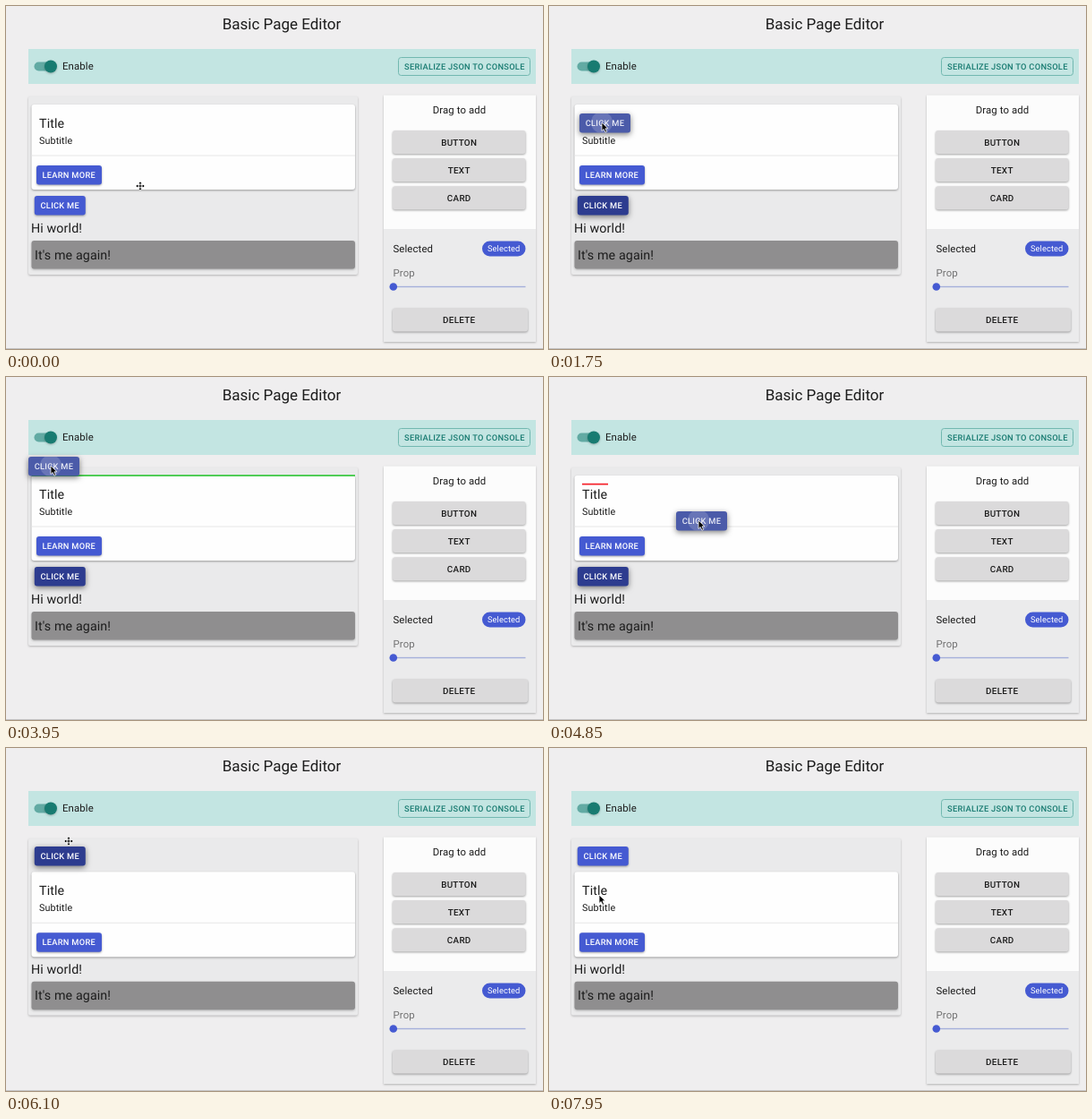
These frames come from a looping animation (600x383 px, 8 s). An HTML page:

```html
<!DOCTYPE html>
<html lang="en">
<head>
<meta charset="utf-8">
<title>Basic Page Editor</title>
<style>
  html, body { margin: 0; width: 100%; height: 100%; overflow: hidden; background: #efeeef; }
  svg { display: block; width: 600px; height: 383px; font-family: Roboto, sans-serif; text-rendering: geometricPrecision; }
  text { font-size: 11.4px; letter-spacing: .1px; fill: #1c1c1c; }
  .mid { text-anchor: middle; }
  .heading { font-size: 14.3px; }
  .small { font-size: 9.3px; font-weight: 500; letter-spacing: .27px; fill: #fff; }
  .large { font-size: 9.9px; font-weight: 500; letter-spacing: .28px; }
  .raised { filter: drop-shadow(0 1.2px 1px rgba(0,0,0,.35)); }
  .lifted { filter: drop-shadow(0 2px 3px rgba(0,0,0,.5)); }
  .paper { filter: drop-shadow(0 1px .8px rgba(0,0,0,.25)); }
</style>
</head>
<body>
<svg viewBox="0 0 600 383">
  <defs>
    <clipPath id="buttonShape"><rect width="57" height="21.5" rx="3"/></clipPath>
  </defs>
  <rect width="600" height="383" fill="#efeeef"/>
  <rect y="382" width="600" height="1" fill="#c4c3c4"/>
  <text class="mid" x="308" y="25.5" style="font-size:17px;letter-spacing:0">Basic Page Editor</text>

  <rect x="25" y="48" width="567" height="39" fill="#c3e5e2"/>
  <rect x="31.5" y="62.5" width="24" height="10" rx="5" fill="#62aaa3"/>
  <circle class="paper" cx="50" cy="67.5" r="7" fill="#187b71"/>
  <text x="63" y="71.3">Enable</text>
  <rect x="438.5" y="57.5" width="147" height="20" rx="3" fill="none" stroke="#72b8b0"/>
  <text class="small" x="445" y="70.6" style="fill:#187b71">SERIALIZE JSON TO CONSOLE</text>

  <rect id="container" class="paper" x="25" y="101" width="368" rx="2" fill="#eaeaeb"/>
  <g id="card">
    <rect class="raised" x="28.5" y="110" width="361.5" height="95" rx="3" fill="#fefefe"/>
    <rect x="28.5" y="166.5" width="361.5" height="1" fill="#e7e7e7"/>
    <text class="heading" x="37" y="136">Title</text>
    <text x="37" y="154" style="font-size:10.8px">Subtitle</text>
    <rect class="raised" x="34" y="178" width="73" height="21.5" rx="3" fill="#455ad2"/>
    <text class="small" x="40.5" y="192.1">LEARN MORE</text>
  </g>
  <g id="button">
    <rect width="57" height="21.5" rx="3"/>
    <text class="small" x="6.7" y="14.1">CLICK ME</text>
  </g>
  <g id="texts">
    <text class="heading" x="28" y="253.2">Hi world!</text>
    <rect class="paper" x="28.5" y="262" width="361.5" height="31.5" rx="3" fill="#8f8e8f"/>
    <text class="heading" x="32" y="282.8">It's me again!</text>
  </g>

  <g class="paper">
    <rect x="422" y="249" width="170" height="126" fill="#ebebec"/>
    <rect x="422" y="99.5" width="170" height="149.5" fill="#fcfcfc"/>
  </g>
  <text class="mid" x="506.5" y="120">Drag to add</text>
  <g id="tools"></g>
  <text x="432.5" y="274.8">Selected</text>
  <rect x="532" y="262.5" width="48.5" height="17" rx="8.5" fill="#455ad2"/>
  <text class="mid" x="556.2" y="274.2" style="font-size:9.3px;fill:#fff">Selected</text>
  <text x="432.5" y="301.5" style="fill:#727272">Prop</text>
  <rect x="433" y="312.8" width="147.5" height="1.4" fill="#a4afda"/>
  <circle cx="432.8" cy="313.5" r="4.3" fill="#455ad2"/>

  <rect id="indicator" height="1.7"/>
  <g id="ghost">
    <g class="lifted"><rect width="57" height="21.5" rx="3" fill="#4b5ba9"/></g>
    <circle cx="25" cy="10" r="12" fill="#fff" opacity=".16" clip-path="url(#buttonShape)"/>
    <text class="small" x="6.7" y="14.1" style="fill:#e9ebf6">CLICK ME</text>
  </g>
  <g id="cursor" stroke="#fff" stroke-width=".8" stroke-linejoin="round">
    <path id="arrow" d="M0 0V9.5L2.2 7.5 3.9 11.2 5.6 10.4 4 6.8H7Z"/>
    <path id="move" d="M0-5.2 2.3-2.6H.8V-.8H2.6V-2.3L5.2 0 2.6 2.3V.8H.8V2.6H2.3L0 5.2-2.3 2.6H-.8V.8H-2.6V2.3L-5.2 0-2.6-2.3V-.8H-.8V-2.6H-2.3Z"/>
  </g>
</svg>
<script>
const LOOP = 8000, STEP = 50;
const DRAG_START = 1150, DROP = 5750;
const $ = id => document.getElementById(id);

// Cursor stops: time, x, y
const path = [
  [150, 150, 201], [950, 57, 222], [1150, 57, 222], [1700, 59, 130], [1900, 59, 130],
  [2600, 108.5, 130], [2950, 108.5, 130], [3800, 50, 99], [4050, 50, 99],
  [4750, 167, 160], [4950, 167, 160], [5650, 70, 104], [6300, 70, 104], [7800, 56, 164]
];

// Drop markers: start time, x, y, width, colour
const RED = '#f5222b', GREEN = '#36c83c';
const markers = [
  [0, 0, 0, 0, RED],
  [2050, 37, 159.2, 37, RED],
  [3400, 28.5, 109.2, 361.5, GREEN],
  [4350, 37, 118.8, 29, RED],
  [5400, 28.5, 109.2, 361.5, GREEN],
  [DROP, 0, 0, 0, RED]
];

$('tools').innerHTML = [['BUTTON', 432, 139, 148.5], ['TEXT', 432, 170, 148.5], ['CARD', 432, 201.3, 148.5], ['DELETE', 432, 337.5, 151]]
  .map(([label, x, y, width]) =>
    `<rect class="raised" x="${x}" y="${y}" width="${width}" height="26" rx="3" fill="#dbdadb"/>
     <text class="large mid" x="506.2" y="${y + 16.7}">${label}</text>`).join('');

function cursorAt(t) {
  const next = path.findIndex(([time]) => time > t);
  if (next === 0) return path[0].slice(1);
  if (next < 0) return path[path.length - 1].slice(1);
  const [t0, x0, y0] = path[next - 1], [t1, x1, y1] = path[next];
  const p = (t - t0) / (t1 - t0), ease = p * p * (3 - 2 * p);
  return [x0 + (x1 - x0) * ease, y0 + (y1 - y0) * ease];
}

const place = (id, x, y) => $(id).setAttribute('transform', `translate(${x} ${y})`);
const show = (id, visible) => $(id).setAttribute('display', visible ? 'inline' : 'none');

function render(t) {
  const [x, y] = cursorAt(t);
  const dropped = t >= DROP, dragging = t >= DRAG_START && !dropped;
  const active = t >= 800 && t < 6700;
  const moving = !dragging && t < 7000;

  place('card', 0, dropped ? 28.3 : 0);
  place('texts', 0, dropped ? -1.3 : 0);
  place('button', 31.8, dropped ? 110 : 212);
  $('button').firstElementChild.setAttribute('fill', active ? '#2d3c8f' : '#455ad2');
  $('button').firstElementChild.setAttribute('class', active ? 'lifted' : 'raised');
  $('container').setAttribute('height', dropped ? 197.5 : 199);

  const [, mx, my, width, colour] = markers.filter(([time]) => time <= t).pop();
  for (const [name, value] of Object.entries({ x: mx, y: my, width, fill: colour }))
    $('indicator').setAttribute(name, value);

  show('ghost', dragging);
  place('ghost', x - 25, y - 10);
  place('cursor', x, y);
  show('move', moving);
  show('arrow', !moving);
}

function frame() {
  const t = performance.now() % LOOP;
  render(Math.floor(t / STEP) * STEP);
  requestAnimationFrame(frame);
}
frame();
</script>
</body>
</html>
```
